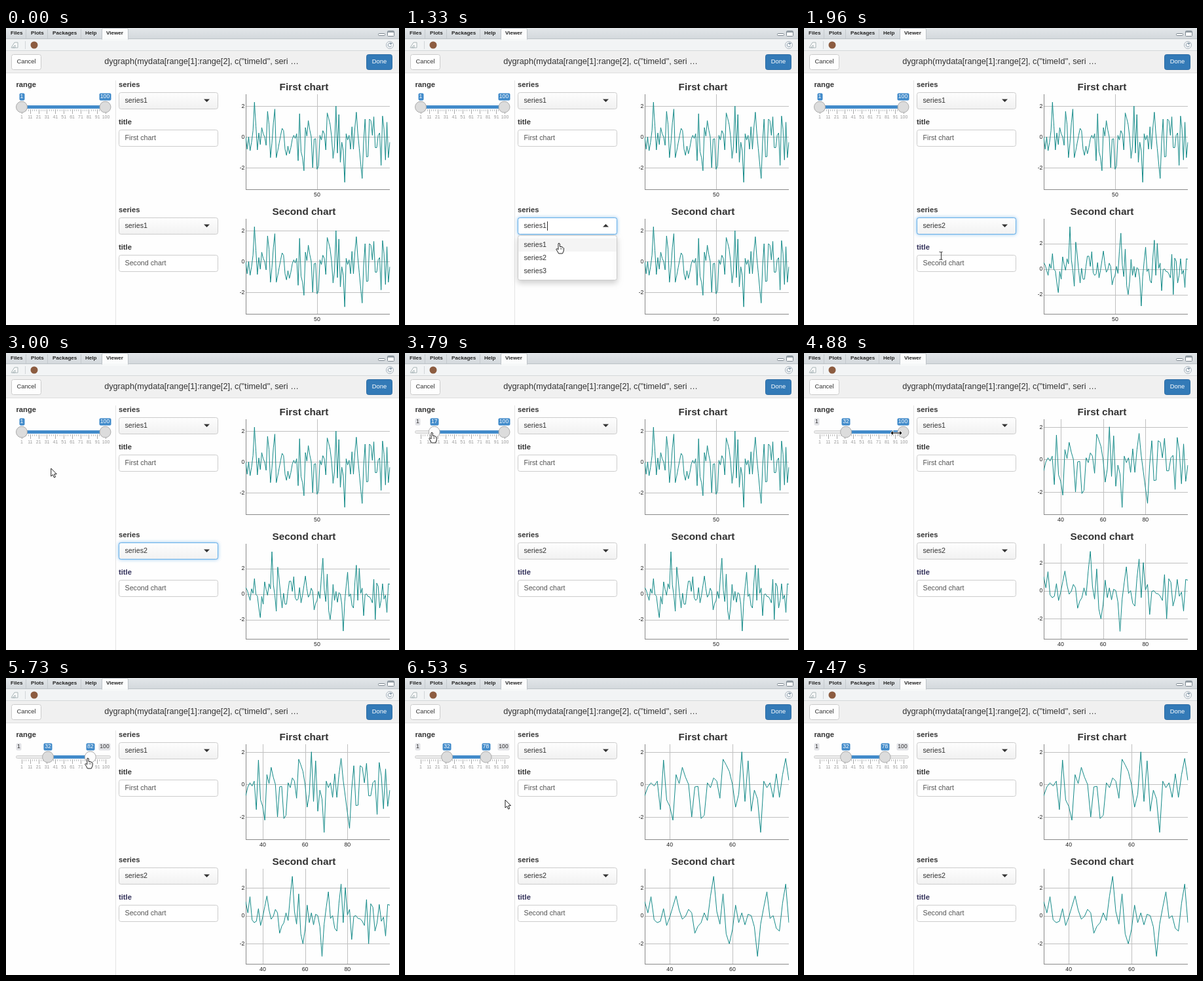
These frames come from a looping animation (600 px wide and 453 px high, 8.98 s). An HTML page with a canvas:

```html
<!DOCTYPE html>
<html lang="en">
<head>
<meta charset="utf-8">
<title>Linked charts</title>
<style>
html, body { margin: 0; width: 100%; height: 100%; overflow: hidden; background: #fefefe; }
canvas { display: block; width: 600px; height: 453px; }
</style>
</head>
<body>
<canvas id="stage" width="600" height="453"></canvas>
<script>
const g = document.getElementById('stage').getContext('2d');
const LOOP = 8980;
const BLUE = '#428bca', INK = '#333';

// Values of each series for timeId 1 to 100.
const series1 = [
  0, -.8, 0, -.9, -.35, .4, 2.25, .7, -.85, .25, -.5, .6, .2, 0, -.55, 1.65, .8, -1.35, -.4, .9,
  1.8, -1.35, -.9, -.4, .1, .55, .4, -.8, -1.2, -.6, -1.1, -.7, -.15, .1, -.1, .2, -1.55, 1.5, -.95, -1.35,
  -2.2, .6, .05, 1.05, .45, 0, -2, -.15, -.12, -2.1, -1.9, .1, -.2, .4, .2, -.85, 1.55, 1.2, .8, 0,
  -1.4, -.6, 2, -1.05, 1.45, -1.65, -.35, -.9, -2.95, .2, -.2, .1, -.8, .65, -.8, .6, 1.6, .25, -.75, -1.75,
  -2.7, -.3, 1.15, -1.3, -1.28, 1.15, 1.05, .1, 1.3, -.7, -.7, .1, .25, -1.85, 1.35, .5, -1.5, .95, -1.35, -.35];
const series2 = [
  .5, .3, -.1, -.5, .4, .05, 1.2, -.05, -.15, -1.1, -1.85, -.2, -.8, .95, .35, -.1, .8, .4, 3.3, .7,
  -.1, -1.35, 2.1, 1.1, -.1, -1.1, .05, -.8, -.8, .2, 1, 1, .2, 1.35, -.3, -.5, -.4, .5, -.7, -.1,
  .65, 1.4, .4, -.25, -.05, .45, .2, -1.25, -.75, -.5, .2, -.35, 1.4, 2.8, .3, -.6, 1.55, -1.3, -2, -1,
  .75, -.5, .2, -.65, .1, 0, -.8, -2.9, -.6, .6, 1.7, -.2, 0, -.9, -1.1, .9, 2.25, -.5, 2, .05,
  .45, -1.7, -.05, 0, -.2, -.22, -.4, -.7, 1.15, -2, .85, .6, -1.1, -.5, .8, -.4, -.1, -1.45, .8, .75];

// Cursor legs: start, end, steps, shape on the way, shape on arrival, points.
const legs = [
  [230, 860, 9, 'arrow', 'hand', [475, 442], [280, 293]],
  [1020, 1710, 10, 'hand', 'hand', [280, 293], [235, 328], [209, 346]],
  [1880, 1880, 1, 'beam', 'beam', [209, 347], [209, 347]],
  [2330, 3170, 12, 'arrow', 'hand', [209, 347], [22, 119]],
  [3250, 3480, 4, 'hand', 'hand', [22, 119], [21, 121]],
  [3630, 4017, 6, 'hand', 'hand', [21, 121], [61, 121]],
  [4094, 4480, 6, 'resize', 'resize', [61, 121], [127, 122]],
  [4560, 4560, 1, 'resize', 'resize', [127, 122], [132, 122]],
  [4880, 5110, 4, 'resize', 'hand', [132, 122], [141, 122], [144, 122], [147, 122], [149, 122]],
  [5340, 5735, 6, 'hand', 'hand', [149, 122], [120, 122]],
  [6530, 6530, 1, 'arrow', 'arrow', [120, 122], [153, 186]],
  [6609, 7400, 11, 'arrow', 'arrow', [153, 186], [505, 442]]
];

function stepped(t, start, end, steps) {
  if (t < start) return 0;
  if (t >= end) return 1;
  return Math.floor((t - start) / (end - start) * (steps - 1) + 1.001) / steps;
}

function text(str, x, y, size, color = INK, align = 'left', bold = false) {
  g.font = `${bold ? 'bold ' : ''}${size}px "Liberation Sans", Arial, sans-serif`;
  g.textAlign = align;
  g.textBaseline = 'middle';
  g.fillStyle = color;
  g.fillText(str, x, y);
}

function rect(x, y, w, h, color) {
  g.fillStyle = color;
  g.fillRect(x, y, w, h);
}

function box(x, y, w, h, r, fill, stroke) {
  g.beginPath();
  g.roundRect(x + .5, y + .5, w - 1, h - 1, r);
  g.fillStyle = fill;
  g.fill();
  if (stroke) {
    g.strokeStyle = stroke;
    g.lineWidth = 1;
    g.stroke();
  }
}

function poly(points, fill, stroke, width = 1, closed = true) {
  g.beginPath();
  points.forEach(([x, y]) => g.lineTo(x, y));
  if (closed) g.closePath();
  if (fill) { g.fillStyle = fill; g.fill(); }
  if (stroke) { g.strokeStyle = stroke; g.lineWidth = width; g.stroke(); }
}

function vertical(y1, y2, top, bottom) {
  const fill = g.createLinearGradient(0, y1, 0, y2);
  fill.addColorStop(0, top);
  fill.addColorStop(1, bottom);
  return fill;
}

function circle(x, y, r, fill, stroke) {
  g.beginPath();
  g.arc(x, y, r, 0, Math.PI * 2);
  g.fillStyle = fill;
  g.fill();
  if (stroke) { g.strokeStyle = stroke; g.lineWidth = 1; g.stroke(); }
}

function drawHeader() {
  rect(0, 0, 600, 17, vertical(0, 17, '#e2e6e9', '#d3d8dc'));
  rect(0, 16, 600, 1, '#bcc2c7');
  rect(0, 17, 600, 18, '#f2f4f5');
  rect(0, 34, 600, 1, '#d5d8da');
  box(146, 0, 41, 19, 2, '#fbfcfc', '#bcc2c7');
  rect(147, 16, 39, 4, '#f6f8f8');
  [['Files', 7], ['Plots', 38], ['Packages', 71], ['Help', 121], ['Viewer', 153]]
    .forEach(([name, x]) => text(name, x, 8, 8.1, '#222', 'left', true));
  [30, 63, 114].forEach(x => rect(x, 2, 1, 14, '#c4c9cd'));

  box(568, 8, 11, 4, 1, '#fff', '#7c8790');
  box(582, 4, 11, 9, 1, '#fff', '#7c8790');
  rect(583, 5, 9, 2, '#9aa4ab');

  poly([[8, 30], [13, 22], [18, 22], [18, 30]], '#fafafa', '#a9b5b8');
  poly([[10, 30], [14, 26], [14, 30]], null, '#a9b5b8');
  rect(29, 20, 1, 12, '#d2d6d8');
  circle(43, 26, 5.5, '#8c5c40');
  circle(586, 26, 5.5, '#f7f9fa', '#a9b4bd');
  g.beginPath();
  g.arc(586, 26, 2.8, .3, 5.2);
  g.strokeStyle = '#8496a5';
  g.stroke();
  poly([[586, 22], [590, 23], [587, 26]], '#8496a5');

  rect(0, 35, 600, 34, '#f0f0f0');
  rect(0, 68, 600, 1, '#dedede');
  box(8, 40, 46, 24, 3, '#fefefe', '#ccc');
  text('Cancel', 31, 51.5, 9.4, INK, 'center');
  box(550, 40, 40, 24, 3, '#337ab7', '#2e6da4');
  text('Done', 570, 51.5, 9.4, '#fff', 'center');
  text('dygraph(mydata[range[1]:range[2], c("timeId", seri …', 298.5, 51, 12.7, INK, 'center');
}

const sliderX = value => 24 + (value - 1) * 128 / 99;

function badge(label, x, fill, color) {
  g.font = '8.6px "Liberation Sans", Arial, sans-serif';
  const w = Math.round(g.measureText(label).width + 4.5);
  box(Math.round(x - w / 2), 99, w, 12, 2, fill);
  text(label, x, 105, 8.6, color, 'center');
}

function drawSlider(low, high, activeLow, activeHigh) {
  const x1 = sliderX(low), x2 = sliderX(high);
  text('range', 15.5, 87, 11.2, INK, 'left', true);
  box(15, 118, 145, 5, 2, '#ececec', '#cfcfcf');
  rect(x1, 118, x2 - x1, 5, BLUE);
  for (let i = 0; i <= 40; i++) {
    const major = i % 4 === 0;
    rect(Math.round(24 + i * 3.2), 124, 1, major ? 7 : 3, major ? '#aaa' : '#c4c4c4');
  }
  for (let i = 0; i <= 10; i++) {
    text(String(Math.min(100, 1 + i * 10)), 24 + i * 12.85, 136, 7, '#999', 'center');
  }
  if (low > 8) badge('1', 19.5, '#e1e2e6', INK);
  if (high < 90) badge('100', 150.5, '#e1e2e6', INK);
  badge(String(low), x1, BLUE, '#fff');
  badge(String(high), Math.min(x2, 151), BLUE, '#fff');
  [[x1, activeLow], [x2, activeHigh]].forEach(([x, active]) =>
    circle(Math.min(x, 151.5), 120.5, 8.5, active ? '#fcfcfc' : '#dcdcdc', '#aaa'));
}

function focusGlow(y) {
  g.save();
  g.shadowColor = 'rgba(102,175,233,.7)';
  g.shadowBlur = 5;
  box(172, y, 152, 26, 3, '#fff', '#66afe9');
  g.restore();
}

function drawSelect(y, value, focused, open) {
  if (focused) focusGlow(y);
  const fill = open ? '#fff' : vertical(y, y + 26, '#fefefe', '#f1f1f1');
  box(172, y, 152, 26, 3, fill, focused ? '#66afe9' : '#ccc');
  text(value, 181.5, y + 13, 10.7);
  const tip = open ? -1 : 1, cy = y + 12.5;
  poly([[302, cy - 2 * tip], [311, cy - 2 * tip], [306.5, cy + 2.5 * tip]], INK);
  if (open) rect(217, y + 6, 1, 14, INK);
}

function drawControls(y, value, title, focused, open, titleColor) {
  text('series', 172, y - 11, 11.2, INK, 'left', true);
  text('title', 172, y + 46, 11.2, titleColor, 'left', true);
  box(172, y + 57, 152, 26, 3, '#fff', '#ccc');
  text(title, 181.5, y + 70, 10.7, '#555');
  drawSelect(y, value, focused, open);
}

function drawDropdown(hovered) {
  g.save();
  g.shadowColor = 'rgba(0,0,0,.18)';
  g.shadowBlur = 8;
  g.shadowOffsetY = 4;
  box(172, 316, 152, 69, 3, '#fff', '#ccc');
  g.restore();
  rect(173, 321 + hovered * 20, 150, 20, '#f4f4f4');
  ['series1', 'series2', 'series3'].forEach((name, i) => text(name, 181.5, 331 + i * 20, 10.7));
}

function drawChart(top, title, data, from, to, zero, unit) {
  const left = 366, width = 220, height = 145;
  const px = id => left + (id - from) * width / (to - from);
  const py = v => top + zero - v * unit;
  text(title, 455, top - 10.5, 15.3, INK, 'center', true);
  [2, 0, -2].forEach(v => {
    rect(left, Math.round(py(v)), width, 1, '#c0c0c0');
    text(String(v), 364.5, py(v) + .5, 8.8, '#222', 'right');
  });
  const ids = to - from > 80 ? [50] : [40, 60, 80].filter(id => id < to);
  ids.forEach(id => {
    rect(Math.round(px(id)), top, 1, height, '#c0c0c0');
    text(String(id), px(id), top + 154, 8.8, '#222', 'center');
  });
  rect(left, top, 1, height + 1, '#8a8a8a');
  rect(left, top + height, width, 1, '#8a8a8a');
  g.save();
  g.beginPath();
  g.rect(left, top, width + .5, height);
  g.clip();
  poly(data.slice(from - 1, to).map((v, i) => [px(from + i), py(v)]), null, '#148a88', 1, false);
  g.restore();
}

const shapes = {
  arrow() {
    poly([[0, 0], [0, 12], [2.8, 9.5], [4.8, 14], [6.8, 13], [4.9, 8.8], [8.5, 8.6]], '#fff', '#222');
  },
  hand() {
    poly([[-1, 1], [0, 0], [1.3, 1], [1.5, 5.5], [4, 5.5], [6, 6.5], [7.5, 8], [7.2, 12], [5.5, 16],
      [-.5, 16], [-2, 13], [-4.3, 9.5], [-3, 8.5], [-1, 10]], '#fff', '#222');
    [2, 4.3].forEach(x => rect(x, 7, .7, 3, '#555'));
  },
  beam() {
    poly([[-2.5, -5.5], [0, -5], [2.5, -5.5]], null, '#333', 1, false);
    poly([[0.5, -5], [0.5, 6]], null, '#333', 1, false);
    poly([[-2.5, 6.5], [0, 6], [2.5, 6.5]], null, '#333', 1, false);
  },
  resize() {
    poly([[-9, 0], [-5, -4], [-5, -1], [5, -1], [5, -4], [9, 0], [5, 4], [5, 1], [-5, 1], [-5, 4]], '#111', '#fff', .8);
  }
};

function cursorAt(t) {
  if (t >= 7470) return null;
  const leg = legs.filter(l => l[0] <= t).pop();
  if (!leg) return null;
  const [start, end, steps, moving, arrived, ...points] = leg;
  const p = stepped(t, start, end, steps);
  const pos = p * (points.length - 1);
  const i = Math.min(Math.floor(pos), points.length - 2);
  const [a, b] = [points[i], points[i + 1]];
  const mix = k => a[k] + (b[k] - a[k]) * (pos - i);
  return { x: mix(0), y: mix(1), shape: p < 1 ? moving : arrived };
}

function draw(t) {
  const cursor = cursorAt(t);
  const open = t >= 1020 && t < 1880;
  const picked = t >= 1880;
  const focused = t >= 1020 && t < 3250;
  const low = Math.round(1 + 31 * stepped(t, 3630, 4017, 6));
  const high = Math.round(100 - 22 * stepped(t, 5340, 5735, 6));
  const zoomed = t >= 4249;
  const from = zoomed ? 32 : 1;
  const to = t >= 5970 ? 78 : 100;
  const scale1 = zoomed ? [61.3, 24.8] : [65, 23.5];
  const scale2 = zoomed ? [71.5, 21.4] : [76.5, 19.5];

  rect(0, 0, 600, 453, '#fefefe');
  drawHeader();
  rect(167, 80, 1, 373, '#e4e4e4');
  drawSlider(low, high, t >= 3250 && t < 4094, t >= 5110 && t < 6050);
  drawControls(98, 'series1', 'First chart', false, false, INK);
  drawControls(289, picked ? 'series2' : 'series1', 'Second chart', focused, open, picked ? '#302e58' : INK);
  drawChart(101, 'First chart', series1, from, to, ...scale1);
  if (t >= 1960) drawChart(291, 'Second chart', series2, from, to, ...scale2);
  else drawChart(291, 'Second chart', series1, from, to, ...scale1);
  if (open) drawDropdown(cursor.y > 340 ? 1 : 0);
  if (cursor) {
    g.save();
    g.translate(cursor.x, cursor.y);
    shapes[cursor.shape]();
    g.restore();
  }
}

function frame() {
  draw(performance.now() % LOOP);
  requestAnimationFrame(frame);
}
frame();
</script>
</body>
</html>
```
